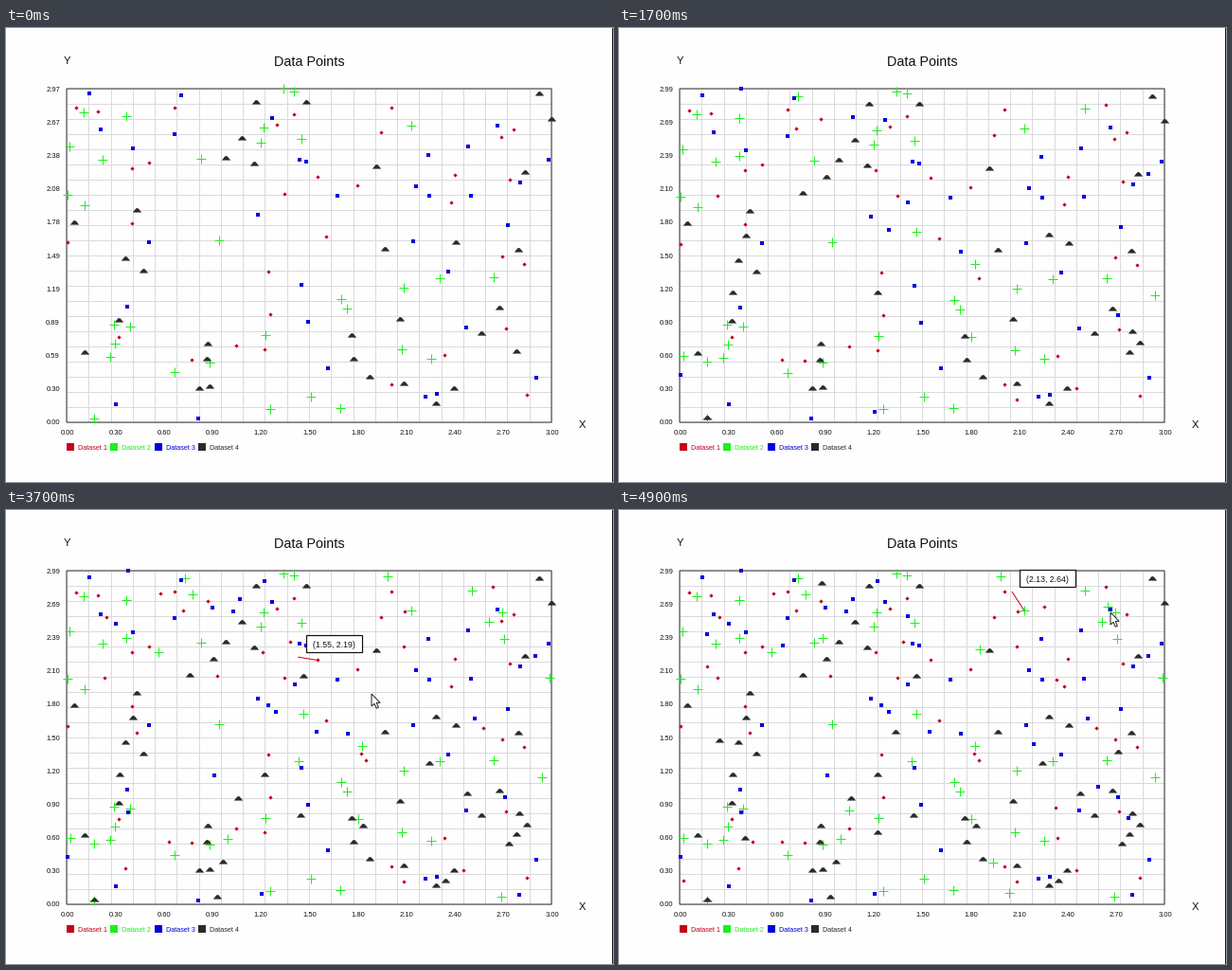
A matplotlib script that plays this animation: 641 px wide and 479 px high, repeating every 5 s.

```python
import math

import numpy as np
import matplotlib
import matplotlib.pyplot as plt
from matplotlib.animation import FuncAnimation
from matplotlib.patches import Polygon, Rectangle

W, H, DPI = 641, 479, 64
FRAMES, STEP_MS = 50, 100
LEFT, RIGHT, TOP, BOTTOM = 64, 576, 64, 416
X_MAX, Y_LIMIT = 3.0, 2.96
START_COUNT, NEW_COUNT = 32, 25  # points per dataset
GRID_CELLS = 22
RED, GREEN, BLUE, DARK = "#c4001a", "#1df01d", "#0000dc", "#2a2a2a"
PX = 72 / DPI  # points per pixel

# Data points that get hovered, and those that set the axis ranges.
HOVERED = [(1.55, 2.19), (1.30, 2.65), (2.13, 2.64)]
FIRST_TOP, FINAL_TOP, FAR_RIGHT = (1.34, 2.971), (0.38, 2.993), (3.0, 2.70)

# Pointer path: (tick, x, y) of the tip.
PATH = np.array([(20, 398, 12), (22, 390, 47), (24, 388, 130),
                 (26, 387, 192), (35, 387, 192), (37, 386, 194),
                 (40, 383, 157), (42, 383, 157), (49, 519, 108)])
HOVER_START = 35
HOVER_SCALE = 0.8  # the chart sees the pointer in unscaled page units
ARROW = np.array([(0, 0), (0, 13), (3, 10.3), (5.2, 15.2), (7.4, 14.2),
                  (5.2, 9.4), (9.2, 9.4)])
WEDGE = [(-4.5, -2), (-1, 2.2), (1, 2.2), (4.5, -2), (-4.5, -2)]

matplotlib.rcParams["font.family"] = "Liberation Sans"
rng = np.random.default_rng(12)

fig = plt.figure(figsize=(W / DPI, H / DPI), dpi=DPI, facecolor="#fefefe")
ax = fig.add_axes([0, 0, 1, 1])
ax.set_xlim(0, W)
ax.set_ylim(H, 0)
ax.axis("off")


def to_stage(points, y_max):
    x, y = np.asarray(points, float).T
    return np.column_stack([LEFT + x / X_MAX * (RIGHT - LEFT),
                            BOTTOM - y / y_max * (BOTTOM - TOP)])


def label(x, y, text, size, color="#111111", ha="center", **kw):
    return ax.text(x, y, text, size=size * PX, color=color, ha=ha,
                   va="center_baseline", **kw)


def line(xs, ys, color, **kw):
    return ax.plot(xs, ys, color=color, lw=PX, **kw)[0]


def draw_chart():
    for x in np.linspace(LEFT, RIGHT, GRID_CELLS + 1):
        line([x, x], [TOP, BOTTOM], "#dadadd", zorder=1)
    for y in np.linspace(TOP, BOTTOM, GRID_CELLS + 1):
        line([LEFT, RIGHT], [y, y], "#dadadd", zorder=1)
    ax.add_patch(Rectangle((LEFT, TOP), RIGHT - LEFT, BOTTOM - TOP, fill=False,
                           ec="#333333", lw=PX, snap=False, zorder=2))
    ax.add_patch(Rectangle((639.5, 0), 1.5, H, fc="#1a1a1a", lw=0))
    label(320, 34, "Data Points", 14.4)
    label(64.5, 33.7, "Y", 11.2)
    label(608.5, 418.5, "X", 11.2)
    for i, x in enumerate(np.linspace(LEFT, RIGHT, 11)):
        label(x + 0.5, 426.3, f"{X_MAX * i / 10:.2f}", 7.6)


def draw_legend():
    for i, color in enumerate((RED, GREEN, BLUE, DARK)):
        x = 64 + 46.4 * i
        ax.add_patch(Rectangle((x, 438), 8, 8, fc=color, lw=0))
        label(x + 12, 442.5, f"Dataset {i + 1}", 7.2, color, ha="left")


def series(color, marker, size, edge=0, fixed=(), first_new=None):
    points = rng.uniform((0, 0), (X_MAX, Y_LIMIT),
                         (START_COUNT + NEW_COUNT, 2))
    for i, point in enumerate(fixed):
        points[i] = point
    if first_new:
        points[START_COUNT] = first_new
    art, = ax.plot([], [], ls="none", marker=marker, ms=size * PX, mfc=color,
                   mec=color, mew=edge * PX, zorder=3)
    return art, points


draw_chart()
draw_legend()
y_labels = [label(57, y, "", 7.6, ha="right")
            for y in np.linspace(BOTTOM, TOP, 11)]
all_series = [
    series(RED, "D", 3, fixed=HOVERED[:2]),
    series(GREEN, "+", 10, edge=1, fixed=[HOVERED[2], FIRST_TOP]),
    series(BLUE, "s", 4.4, first_new=FINAL_TOP),
    series(DARK, WEDGE, 9.4, fixed=[FAR_RIGHT]),
]

tip_line = line([], [], RED, zorder=5)
tip_box = ax.add_patch(Rectangle((0, 0), 59, 18.5, fc="white", ec="#111111",
                                 lw=1.2 * PX, zorder=6))
tip_text = label(0, 0, "", 8.8, zorder=7)
arrow = ax.add_patch(Polygon(ARROW, fc="white", ec="#222222", lw=PX,
                             zorder=9))


def place_tip(mouse, y_max):
    spots = to_stage(HOVERED, y_max)
    best = np.argmin(np.hypot(*(spots - mouse).T))
    tip_line.set_data(*zip(mouse, spots[best]))
    tip_box.set_xy(mouse + (8, -23.5))
    tip_text.set_position(mouse + (37.5, -14))
    tip_text.set_text("({:.2f}, {:.2f})".format(*HOVERED[best]))


def update(k):
    count = START_COUNT + math.ceil(NEW_COUNT * k / (FRAMES - 1))
    y_max = max(points[:count, 1].max() for _, points in all_series)
    for i, text in enumerate(y_labels):
        text.set_text(f"{y_max * i / 10:.2f}")
    for art, points in all_series:
        art.set_data(*to_stage(points[:count], y_max).T)

    tip = np.array([np.interp(k, PATH[:, 0], PATH[:, i]) for i in (1, 2)])
    arrow.set_visible(k >= PATH[0, 0])
    arrow.set_xy(ARROW + tip)
    place_tip(tip * HOVER_SCALE, y_max)
    for art in (tip_line, tip_box, tip_text):
        art.set_visible(k >= HOVER_START)
    return []


anim = FuncAnimation(fig, update, frames=FRAMES, interval=STEP_MS,
                     repeat=True, repeat_delay=0)
plt.show()
```
